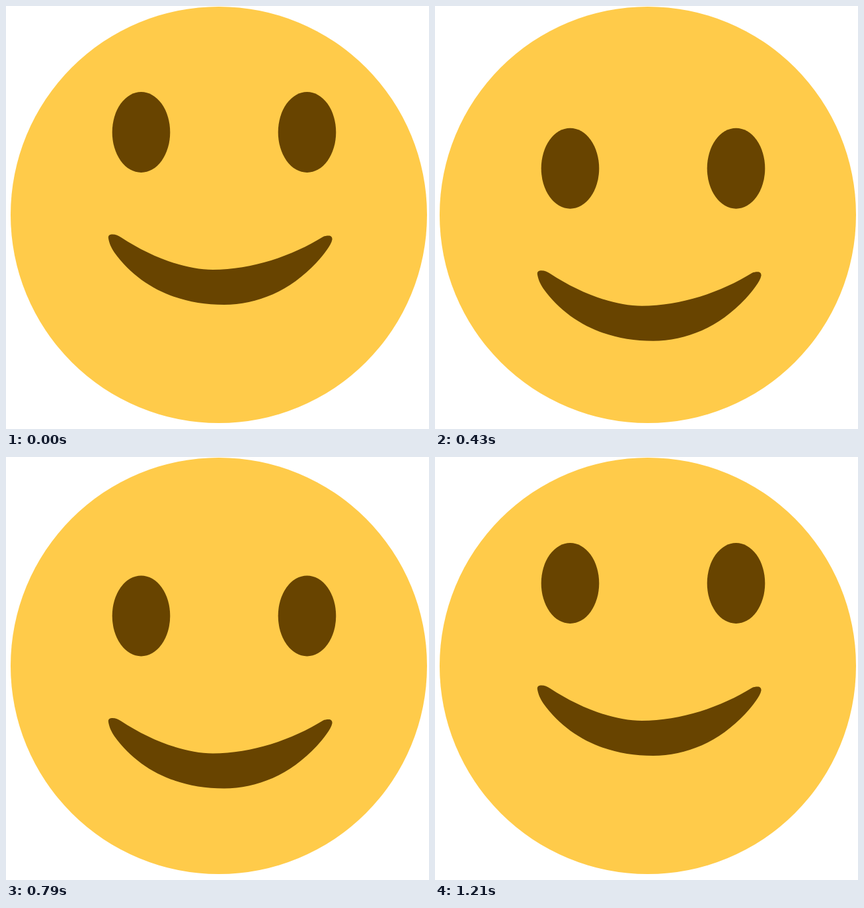
Recreate the animation shown at these times as an HTML page. Size 640 by 640 pixels, loop 1710 ms.

```html
<!DOCTYPE html>
<html lang="en">
<head>
<meta charset="utf-8">
<title>Nodding smiley</title>
<style>
  html, body { margin: 0; width: 100%; height: 100%; overflow: hidden; background: #fff; }
  svg { display: block; width: 100%; height: 100%; }
  .skin { fill: #ffcb4a; }
  #face { fill: #684400; }
</style>
</head>
<body>
<svg viewBox="0 0 640 640">
  <circle class="skin" cx="322" cy="316" r="315"/>
  <g id="face">
    <ellipse cx="204.5" cy="191" rx="43.8" ry="61"/>
    <ellipse cx="455.5" cy="191" rx="43.8" ry="61"/>
    <path d="M155 352C154 347 157 345.5 161 345.5C166 345.5 170 347.5 174 350
      C218 379 270 399 313 399C372 399 433 378 480 349
      C482 348 485 347.5 488 347.5C492 347.5 494 350 493.5 353.5
      C492 362 480 377 470 388C430 431 380 452 330 452
      C260 452 202 425 164 373C159 366 156 358 155 352Z"/>
  </g>
</svg>
<script>
  const LOOP = 1710, FPS = 14, LAST = 17;
  const DROP = 65.6, PEAK = 8.5, END = 16.05;
  const face = document.getElementById('face');

  // Brisk start, soft landing
  function down(p) {
    const s = 0.7;
    return s * p + (3 - 2 * s) * p * p + (s - 2) * p * p * p;
  }

  function up(p) {
    return (1 + Math.cos(Math.PI * p)) / 2;
  }

  function offset(step) {
    if (step >= END) return 0;
    return DROP * (step < PEAK ? down(step / PEAK) : up((step - PEAK) / (END - PEAK)));
  }

  // Steps run at 14 per second, with starts rounded to 10 ms
  function stepAt(ms) {
    const tick = Math.floor(ms / 10) * 10 + 5;
    return Math.min(LAST, Math.floor(tick * FPS / 1000));
  }

  function draw() {
    const y = offset(stepAt(performance.now() % LOOP));
    face.setAttribute('transform', `translate(0 ${y.toFixed(2)})`);
    requestAnimationFrame(draw);
  }
  draw();
</script>
</body>
</html>
```
